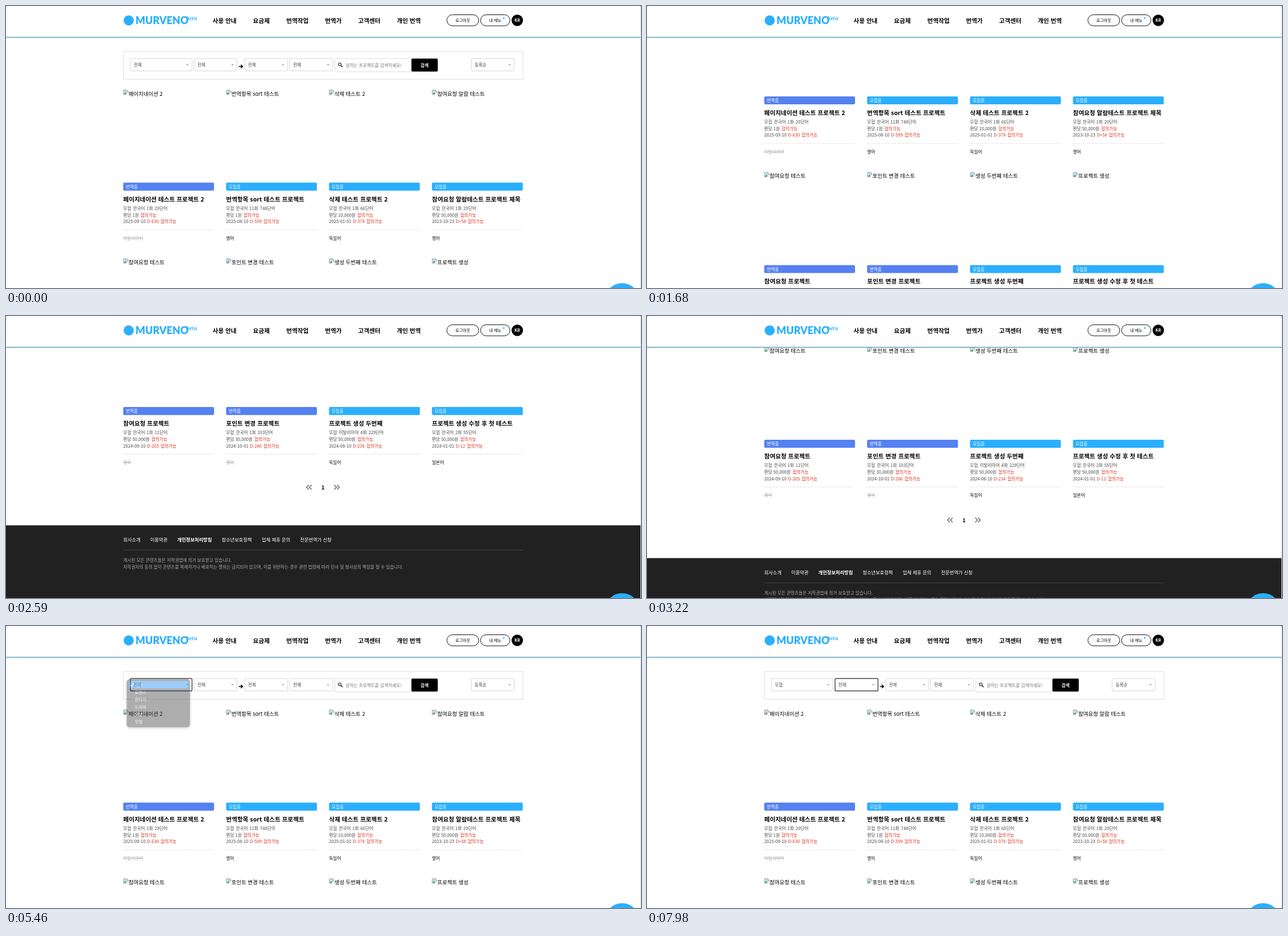
These frames come from a looping animation (1123x499 px, 8000 ms). An HTML page:

```html
<!DOCTYPE html>
<html lang="ko">
<head>
<meta charset="utf-8">
<title>번역 프로젝트 목록</title>
<style>
html, body { margin: 0; width: 100%; height: 100%; overflow: hidden; background: #fff; }
svg { display: block; width: 1123px; height: 499px; font-family: "Noto Sans CJK KR", "Noto Sans KR", "Noto Sans CJK", "Noto Sans", sans-serif; }
</style>
</head>
<body>
<svg id="stage" viewBox="0 0 1123 499" xmlns="http://www.w3.org/2000/svg"></svg>
<script>
const LOOP = 8000;
const BLUE = '#2aafff', BUSY = '#5581f1', RED = '#d5301f';
const SMALL = 7.7;

// Text whose glyphs are centred vertically on cy.
const text = (x, cy, size, str, extra = '') =>
  `<text x="${x}" y="${(cy + size * 0.38).toFixed(2)}" font-size="${size}" ${extra}>${str}</text>`;
const rect = (x, y, w, h, extra = '') =>
  `<rect x="${x}" y="${y}" width="${w}" height="${h}" ${extra}/>`;
const red = str => `<tspan dx="2.8" fill="${RED}" font-weight="500">${str}</tspan>`;

function select(x, w, label, id) {
  return rect(x, 92.9, w, 22, `id="${id}" rx="2" fill="#fff" stroke="#d4d4d4"`) +
    text(x + 6, 103.9, SMALL, label, `id="${id}Text" fill="#444"`) +
    `<path d="M${x + w - 10.4} 102.9h4.4l-2.2 2.3z" fill="#999"/>`;
}

function filterBar() {
  return rect(207.7, 80.5, 706.6, 49, 'fill="#fff" stroke="#dedede"') +
    select(220, 109, '전체', 'genre') + select(332.5, 76, '전체', 'from') +
    '<path d="M411.8 107h6.4M415.4 104.1l3 2.9l-3 2.9" fill="none" stroke="#000" stroke-width="1.5"/>' +
    select(422, 76, '전체', 'to') + select(501.8, 76, '전체', 'state') +
    rect(581.5, 92.9, 136, 23.6, 'rx="2" fill="#fff" stroke="#dcdcdc"') +
    '<path d="M592.4 105.4l2.9 2.9" stroke="#222" stroke-width="1.5"/>' +
    '<circle cx="590.2" cy="103.2" r="2.5" fill="none" stroke="#222" stroke-width="1.1"/>' +
    text(600.7, 104.9, SMALL, '원하는 프로젝트를 검색하세요!', 'fill="#777"') +
    rect(717, 93, 46.6, 23, 'rx="2"') +
    text(740.2, 104.7, SMALL, '검색', 'fill="#fff" font-weight="700" text-anchor="middle"') +
    select(822.7, 76, '등록순', 'sort');
}

function brokenImage(x, y) {
  return `<g transform="translate(${x} ${y})">
    <path d="M.5 1.5q0-1 1-1h4.7l2.6 2.6v5.4h-8.3z" fill="#c5dcf6" stroke="#9b9b9b" stroke-width=".9"/>
    <path d="M1 8l2.9-3.3l1.8 1.7l-1.6 1.7z" fill="#51a64a"/>
    <path d="M4.6 8.9l4.6-4.4v4.4z" fill="#fff"/>
    <path d="M6.2.5v2.6h2.6z" fill="#fff" stroke="#9b9b9b" stroke-width=".6"/></g>`;
}

// [alt, title, genre line, price, date, d-day, language, in progress, language closed]
const CARDS = [
  ['페이지네이션 2', '페이지네이션 테스트 프로젝트 2', '무협 한국어 1화 29단어', '1', '2025-09-10', 'D-630', '이탈리아어', 1, 1],
  ['번역항목 sort 테스트', '번역항목 sort 테스트 프로젝트', '무협 한국어 11화 748단어', '1', '2025-08-10', 'D-599', '영어', 0, 0],
  ['삭제 테스트 2', '삭제 테스트 프로젝트 2', '무협 한국어 1화 66단어', '10,000', '2025-01-01', 'D-378', '독일어', 0, 0],
  ['참여요청 알람 테스트', '참여요청 알람테스트 프로젝트 제목', '무협 한국어 1화 29단어', '50,000', '2023-10-23', 'D+58', '영어', 0, 0],
  ['참여요청 테스트', '참여요청 프로젝트', '무협 한국어 1화 11단어', '50,000', '2024-09-10', 'D-265', '영어', 1, 1],
  ['포인트 변경 테스트', '포인트 변경 프로젝트', '무협 한국어 1화 103단어', '30,000', '2024-10-01', 'D-286', '영어', 1, 1],
  ['생성 두번째 테스트', '프로젝트 생성 두번째', '무협 이탈리아어 4화 229단어', '50,000', '2024-08-10', 'D-234', '독일어', 0, 0],
  ['프로젝트 생성', '프로젝트 생성 수정 후 첫 테스트', '무협 한국어 2화 55단어', '50,000', '2024-01-01', 'D-12', '일본어', 0, 0]
];

function card([alt, title, genre, price, date, dday, lang, busy, closed], i) {
  const x = 207.3 + (i % 4) * 182, y = Math.floor(i / 4) * 298.5;
  const gray = 'fill="#444"';
  return brokenImage(x, y + 148) +
    text(x + 9.4, y + 155, 9.5, alt) +
    rect(x, y + 312.6, 160.6, 14.2, `rx="2" fill="${busy ? BUSY : BLUE}"`) +
    text(x + 4.6, y + 319.9, SMALL, busy ? '번역중' : '모집중', 'fill="#fff" font-weight="500"') +
    text(x, y + 341.5, 10.7, title, 'font-weight="700"') +
    text(x, y + 358, SMALL, genre, gray + ' word-spacing=".8"') +
    text(x, y + 369.7, SMALL, `편당 ${price}원` + red('협의가능'), gray) +
    text(x, y + 381.1, SMALL, date + red(dday) + red('협의가능'), gray) +
    `<path d="M${x} ${y + 396}h160.6" stroke="#d8d8d8" stroke-dasharray="2 1.5"/>` +
    text(x, y + 411, SMALL, lang, closed ? 'fill="#aaa" text-decoration="line-through"' : 'font-weight="500"');
}

function pagination() {
  const chevrons = (x, dir) => [0, 5].map(d =>
    `<path d="M${x + d + 2 * dir} 748.9l${-4 * dir} 4.1l${4 * dir} 4.1" fill="none" stroke="#858585" stroke-width="2"/>`).join('');
  return chevrons(533.5, 1) + text(560.6, 753, 9.5, '1', 'font-weight="700" text-anchor="middle"') + chevrons(582.5, -1);
}

function footer() {
  const links = [[207.3, '회사소개'], [255, '이용약관'], [303, '개인정보처리방침'],
    [381.3, '청소년보호정책'], [452.3, '업체 제휴 문의'], [520, '전문번역가 신청']];
  return rect(0, 820.4, 1122, 400, 'fill="#212121"') +
    links.map(([x, s], i) => text(x, 846, 8.3, s, `fill="#fff" font-weight="${i === 2 ? 700 : 500}"`)).join('') +
    '<path d="M207.3 864.2h707" stroke="#444"/>' +
    text(207.3, 882.3, SMALL, '게시된 모든 콘텐츠들은 저작권법에 의거 보호받고 있습니다.', 'fill="#aaa"') +
    text(207.3, 893.6, SMALL, '저작권자의 동의 없이 콘텐츠를 복제하거나 배포하는 행위는 금지되어 있으며, 이를 위반하는 경우 관련 법령에 따라 민사 및 형사상의 책임을 질 수 있습니다.', 'fill="#aaa"');
}

function header() {
  const nav = [[365.3, '사용 안내'], [436.8, '요금제'], [495.8, '번역작업'],
    [564.2, '번역가'], [622.8, '고객센터'], [691.2, '개인 번역']];
  const pill = (x, w, label) => rect(x, 15.5, w, 19.6, 'rx="9.8" fill="#fff" stroke="#111"') +
    text(x + w / 2, 25.6, 7.1, label, 'text-anchor="middle" font-weight="500"');
  return rect(0, 0, 1123, 55, 'fill="#fff"') +
    '<path d="M0 55.4h1122" stroke="#4395b0" stroke-width="1.3"/>' +
    `<circle cx="217" cy="25.5" r="9" fill="${BLUE}"/>` +
    `<text x="229" y="32" font-family="Lato, sans-serif" font-weight="900" font-size="18" fill="${BLUE}">MURVENO</text>` +
    `<text x="319" y="25" font-family="'Noto Serif', serif" font-style="italic" font-weight="700" font-size="8.5" fill="${BLUE}">beta</text>` +
    nav.map(([x, s]) => text(x, 26, 10.7, s, 'font-weight="700"')).join('') +
    pill(779.7, 56.3, '로그아웃') + pill(839.3, 52, '내 메뉴') +
    `<circle cx="880.3" cy="21.3" r="1.4" fill="${BLUE}"/>` +
    '<circle cx="904.2" cy="25.3" r="10.1"/>' +
    text(904.2, 25.6, 7.1, 'KR', 'fill="#fff" font-weight="700" text-anchor="middle"');
}

const ROW = 13.05;
function menu() {
  const items = ['전체', '로맨스', '판타지', '드라마', '액션', '무협'];
  return '<g id="menu">' +
    rect(213.7, 94.2, 111.4, 84.8, 'rx="5" fill="#3a3a3a" stroke="#5c5c5c" stroke-width=".8" filter="url(#shadow)"') +
    rect(217.8, 97.3, 104.8, 13.2, 'id="highlight" rx="3" fill="#0f84f6"') +
    '<path d="M220.2 104.4l2 2.3l3.3-5" fill="none" stroke="#fff" stroke-width="1.2"/>' +
    items.map((s, i) => text(228, 104 + i * ROW, 7.3, s, 'fill="#fff" font-weight="500"')).join('') + '</g>';
}

document.getElementById('stage').innerHTML = `
  <defs><filter id="shadow" x="-20%" y="-20%" width="140%" height="140%">
    <feDropShadow dx="0" dy="1.5" stdDeviation="2.6" flood-opacity=".4"/></filter></defs>
  <g id="page">${filterBar()}${CARDS.map(card).join('')}${pagination()}${footer()}</g>
  ${header()}
  <circle cx="1089.6" cy="521.5" r="31" fill="${BLUE}"/>
  ${menu()}
  <path d="M1122.5 0v499" stroke="#dcdcdc"/>
  <path d="M0 0h3q-3 0-3 3zM1123 0h-3q3 0 3 3z" fill="#999"/>`;

// Runs of values, one value per tick, each held until the next.
const TICK = 70;
const SCROLL = [[0, [0]], [770, [5, 14]], [980, [22, 33, 46, 59, 69, 76]], [1540, [86, 114, 152.7, 222, 272]],
  [1960, [281, 287, 290]], [2450, [340, 410, 450]], [3080, [442, 424, 392, 318, 220]], [3640, [90, 18, 0]]];
const MENU = [[0, [0]], [5460, [0.41, 0.82, 0.97]], [5950, [1]], [7280, [0.8, 0.5, 0.2, 0]]];
const HOVER = [[0, [0]], [6300, [1, 3, 4]], [6650, [5]]];

function valueAt(runs, t) {
  const [start, values] = runs.filter(([s]) => s <= t).pop();
  return values[Math.min(values.length - 1, Math.floor((t - start) / TICK))];
}

const el = id => document.getElementById(id);
const focus = (id, on) => {
  el(id).setAttribute('stroke', on ? '#222' : '#d4d4d4');
  el(id).setAttribute('stroke-width', on ? 1.2 : 1);
};

function render(t) {
  el('page').setAttribute('transform', `translate(0 ${-valueAt(SCROLL, t)})`);
  const opacity = valueAt(MENU, t);
  el('menu').setAttribute('opacity', opacity);
  el('menu').setAttribute('display', opacity ? 'inline' : 'none');
  el('highlight').setAttribute('y', 97.3 + valueAt(HOVER, t) * ROW);
  focus('genre', t >= 5460 && t < 7980);
  focus('from', t >= 7980);
  el('genreText').textContent = t >= 7630 ? '무협' : '전체';
}

const origin = performance.now();
function loop() {
  render((performance.now() - origin) % LOOP);
  requestAnimationFrame(loop);
}
loop();
</script>
</body>
</html>
```
